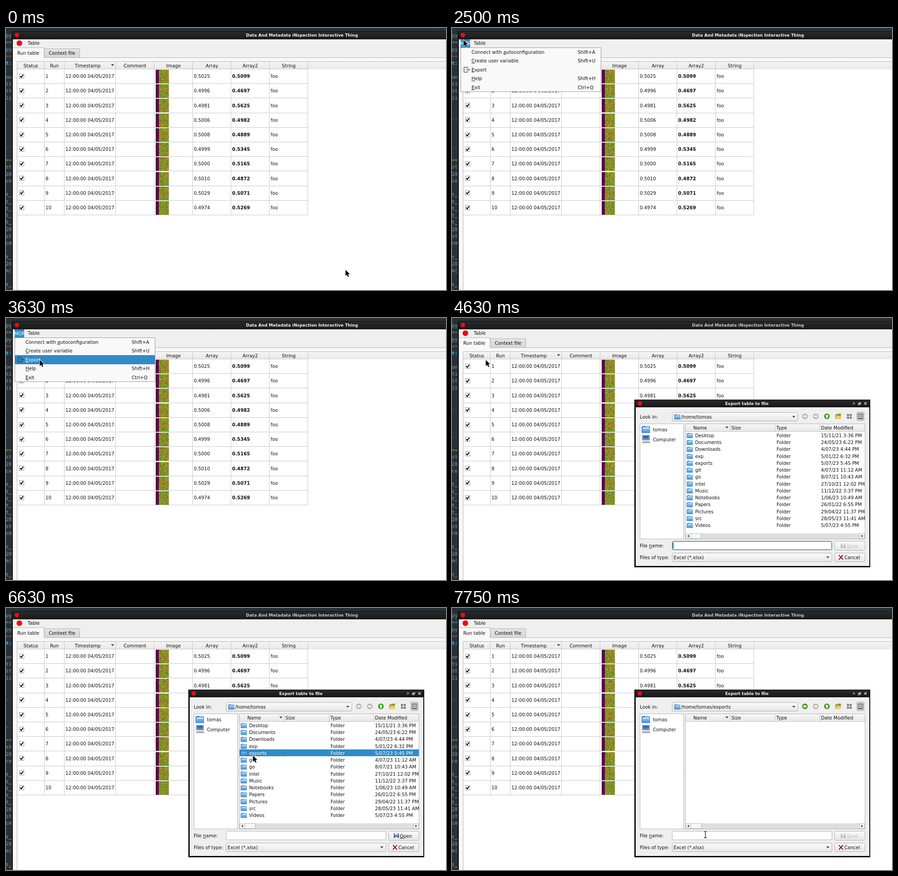
An HTML page with a canvas for the animation above (8 s loop, 970x578 px).

```html
<!DOCTYPE html>
<html lang="en">
<head>
<meta charset="utf-8">
<title>Export table</title>
<style>
  html, body { margin: 0; width: 970px; height: 578px; overflow: hidden; }
  canvas { display: block; }
</style>
</head>
<body>
<canvas id="stage" width="970" height="578"></canvas>
<script>
const g = document.getElementById('stage').getContext('2d');
const LOOP = 8000, STEP = 123;
const FONT = '10.2px "DejaVu Sans", sans-serif';
const BOLD = 'bold ' + FONT;
const TITLE = 'bold 9.07px "DejaVu Sans", sans-serif';
const MONO = '11px "Noto Sans Mono", monospace';
const BLUE = '#308cc6', PANEL = '#efefef', EDGE = '#b4b4b4', INK = '#111', RED = '#f00a14';
const USER = 'tomas';

// ---- drawing helpers ----
function rect(x, y, w, h, fill, stroke) {
  if (fill) { g.fillStyle = fill; g.fillRect(x, y, w, h); }
  if (stroke) { g.strokeStyle = stroke; g.lineWidth = 1; g.strokeRect(x + .5, y + .5, w - 1, h - 1); }
}
function fade(y0, y1, top, bottom) {
  const f = g.createLinearGradient(0, y0, 0, y1);
  f.addColorStop(0, top);
  f.addColorStop(1, bottom);
  return f;
}
function rounded(x, y, w, h, fill, stroke) {
  g.beginPath();
  g.roundRect(x + .5, y + .5, w - 1, h - 1, 2);
  g.fillStyle = fill; g.fill();
  g.strokeStyle = stroke; g.lineWidth = 1; g.stroke();
}
function path(points, { fill, stroke, width = 1, close = !!fill }) {
  g.beginPath();
  points.forEach(([x, y]) => g.lineTo(x, y));
  if (close) g.closePath();
  if (stroke) { g.strokeStyle = stroke; g.lineWidth = width; g.stroke(); }
  if (fill) { g.fillStyle = fill; g.fill(); }
}
function dot(x, y, r, fill) {
  g.beginPath(); g.arc(x, y, r, 0, 7);
  g.fillStyle = fill; g.fill();
}
// y is the middle of the capitals; "&" underlines the next letter
function text(s, x, y, color = INK, font = FONT, align = 'left') {
  g.font = font; g.fillStyle = color; g.textAlign = align;
  const cut = s.indexOf('&');
  s = s.replace('&', '');
  g.fillText(s, x, y + 3.6);
  if (cut >= 0) {
    const left = x + g.measureText(s.slice(0, cut)).width;
    g.fillRect(left, y + 4.7, g.measureText(s[cut]).width, .9);
  }
}
function at(x, y, draw) {
  g.save(); g.translate(x, y); draw(); g.restore();
}
function clipped(x, y, w, h, draw) {
  g.save(); g.beginPath(); g.rect(x, y, w, h); g.clip(); draw(); g.restore();
}
const downArrow = (x, y, c = '#444') => path([[x - 3.5, y - 2], [x + 3.5, y - 2], [x, y + 2]], { fill: c });

// ---- icons ----
function folder(x, y, k = 1) {
  at(x, y, () => {
    g.scale(k, k);
    path([[0, 1], [5, 0], [6, 1], [13, 1], [13, 11], [0, 11]], { fill: '#2b6fb5' });
    rect(1.5, 2.2, 10.5, 2, '#e4f1fb');
    rect(.8, 4.2, 12.6, 7, fade(4, 11, '#8cc4f2', '#3f8fdc'));
  });
}
function computer(x, y) {
  rect(x + 1, y, 17, 12, '#b9bec6', '#7c828c');
  rect(x + 3, y + 2, 13, 8, fade(y + 2, y + 10, '#2750a0', '#5b8fdc'));
  path([[x + 3, y + 14], [x + 17, y + 14], [x + 20, y + 18], [x, y + 18]], { fill: '#a4a9b0' });
}
function roundArrow(x, y, turn, color) {
  dot(x, y, 6.2, color);
  at(x, y, () => {
    g.rotate(turn);
    path([[-4.2, 0], [0, -4], [0, -1.5], [4, -1.5], [4, 1.5], [0, 1.5], [0, 4]], { fill: '#fff' });
  });
}
function disk(x, y, body, label) {
  rect(x, y, 11, 10, body);
  rect(x + 2, y, 7, 4.5, label);
  rect(x + 3, y + 7, 5, 3, '#ddd');
}
function exportIcon(x, y) {
  path([[x + 8, y + 3], [x + 8, y], [x, y], [x, y + 11], [x + 8, y + 11], [x + 8, y + 8]], { stroke: '#222' });
  path([[x + 4, y + 5.5], [x + 12, y + 5.5]], { stroke: '#222' });
  path([[x + 10, y + 3.5], [x + 12.3, y + 5.5], [x + 10, y + 7.5]], { stroke: '#222' });
}
function check(x, y) {
  rect(x, y, 11, 11, '#fff', '#9a9a9a');
  path([[x + 2.4, y + 5.2], [x + 4.6, y + 8], [x + 8.8, y + 2.4]], { stroke: '#000', width: 2 });
}

// ---- noisy thumbnails ----
const noise = document.createElement('canvas');
noise.width = 22; noise.height = 300;
{
  const n = noise.getContext('2d');
  let seed = 7;
  const rnd = () => (seed = seed * 16807 % 2147483647) / 2147483647;
  for (let x = 0; x < 22; x++)
    for (let y = 0; y < 300; y += 2) {
      n.fillStyle = `hsl(${15 + 95 * rnd()},60%,${34 + 12 * rnd()}%)`;
      n.fillRect(x, y, 1, 2);
    }
}

// ---- terminal behind the window: line number, text, colour ----
function terminal() {
  rect(0, 0, 970, 578, '#263238');
  const lines = '0py 1== 2py 3==r 4t:b 6on 7ti 8it 9li 12..y 16..y 18==o 19st 20%28 21ce 23t_ 24t_ 25t_ 26t_ 27t_ 28%28 29st 30cm 32t_ 33%28 34m( 36t_';
  const tint = { r: '#c4524e', b: '#4fb3e8', y: '#a8b436', o: '#c8962e' };
  for (const entry of lines.split(' ')) {
    const [, row, word, c] = entry.match(/^(\d+)%?(..)(.?)$/);
    text(word, -.5, 16.5 + 15.27 * row, tint[c] || '#87989f', c === 'b' ? 'bold ' + MONO : MONO);
  }
}

// ---- main window ----
const EDGES = [24, 84, 128, 241, 326, 411, 495.5, 580, 665];
const HEADS = ['Status', 'Run', 'Timestamp', 'Comment', 'Image', 'Array', 'Array2', 'String'];
const ARRAY = [.5025, .4996, .4981, .5006, .5008, .4999, .5, .501, .5029, .4974];
const ARRAY2 = [.5099, .4697, .5625, .4982, .4889, .5345, .5165, .4872, .5071, .5269];

function mainWindow(active) {
  rect(13, 7, 957, 571, '#0c0c0c');
  rect(15, 8, 955, 17, fade(8, 25, '#2a2a2a', '#181818'));
  dot(24, 15.5, 4.8, RED);
  text('Data And Metadata iNspection Interactive Thing', 652.5, 15.5, active ? '#f2f2f2' : '#c8c8c8', TITLE, 'center');
  rect(15, 25, 955, 553, PANEL);
  dot(29.5, 33.5, 6.2, RED);
  text('Table', 48, 33.8);

  rect(15, 65, 955, 513, '#f8f8f8');
  rect(84, 65, 886, 1, EDGE);
  rect(84, 45, 79, 21, fade(45, 66, '#e4e4e4', '#d6d6d6'), EDGE);
  rect(15, 43, 69, 23, '#f8f8f8');
  rect(15, 43, 69, 1, EDGE);
  rect(83.5, 43, 1, 22, EDGE);
  text('Run table', 49, 55, INK, FONT, 'center');
  text('Context file', 123.5, 55.7, INK, FONT, 'center');
  table();
}
function table() {
  rect(24, 74, 946, 504, '#fff');
  rect(24, 74, 946, 17, fade(74, 91, '#f5f5f5', '#e8e8e8'));
  rect(24, 73.5, 946, 1, EDGE);
  rect(24, 74, 1, 504, EDGE);
  rect(25, 90, 641, 1, '#c4c4c4');
  HEADS.forEach((name, i) => {
    text(name, (EDGES[i] + EDGES[i + 1]) / 2 + .7 - (i === 2 ? 5 : 0), 83, INK, FONT, 'center');
    rect(EDGES[i + 1], 75, 1, 338, '#c6c6c6');
  });
  downArrow(235, 82);
  for (let i = 0; i < 10; i++) {
    const y = 106.5 + 32.22 * i, top = Math.round(y - 14.5);
    rect(25, Math.round(y + 15.6), 641, 1, '#c6c6c6');
    check(29, Math.round(y - 5.8));
    text(String(i + 1), 87, y);
    text('12:00:00 04/05/2017', 131, y);
    rect(330, top, 7, 30, '#560a48');
    g.drawImage(noise, 0, 30 * i, 22, 30, 337, top, 22, 30);
    text(ARRAY[i].toFixed(4), 414, y);
    text(ARRAY2[i].toFixed(4), 498.6, y, INK, BOLD);
    text('foo', 583.5, y);
  }
}

// ---- drop-down menu ----
const MENU = [['Connect with &autoconfiguration', 'Shift+A'], ['&Create user variable', 'Shift+U'],
  ['&Export', ''], ['&Help', 'Shift+H'], ['&Exit', 'Ctrl+Q']];

function menu(pointerY) {
  rect(19, 25, 21, 18, BLUE);
  clipped(19, 25, 21, 18, () => text('MOR', 18.5, 34, '#fff'));
  rect(19, 43, 310, 98, '#f9f9f9', '#999');
  const hover = Math.floor((pointerY - 43) / 19.5);
  MENU.forEach(([label, key], i) => {
    const y = 53.2 + 19.5 * i, lit = i === hover;
    if (lit) rect(20, Math.round(y - 10.5), 308, 20, BLUE, '#2a7bb0');
    text(label, 43, y, lit ? '#fff' : INK);
    text(key, 277, y, lit ? '#fff' : INK);
  });
  exportIcon(26.5, 86.5);
}

// ---- file dialog ----
const FILES = `Desktop|15/11/21 3:36 PM
Documents|24/05/23 6:22 PM
Downloads|4/07/23 4:44 PM
exp|5/01/22 6:32 PM
exports|5/07/23 5:45 PM
git|4/07/23 11:12 AM
go|8/07/21 10:43 AM
intel|27/10/21 12:02 PM
Music|11/12/22 3:37 PM
Notebooks|1/06/23 10:49 AM
Papers|26/01/22 6:55 PM
Pictures|29/04/22 11:37 PM
src|28/05/23 11:41 AM
Videos|5/07/23 4:55 PM`.split('\n').map(line => line.split('|'));

const button = (x, y, w, h) => rounded(x, y, w, h, fade(y, y + h, '#fafafa', '#e7e7e7'), '#b0b0b0');

function dialog(t) {
  const picked = t >= 6500 && t < 6750, canOpen = t >= 6630 && t < 6750;
  const inside = t >= 6750, focus = t < 6500;
  rect(402, 180, 520, 370, '#0a0a0a');
  rect(404, 181, 516, 16, fade(181, 197, '#2a2a2a', '#161616'));
  rect(405, 197, 515, 350, PANEL);
  dot(414, 188.5, 4.8, RED);
  text('Export table to file', 650, 188.5, '#f2f2f2', TITLE, 'center');
  path([[883, 191], [886, 188.5], [886, 185]], { stroke: '#ddd' });
  path([[885, 188.5], [889, 189.5]], { stroke: '#ddd' });
  rect(895, 188, 5, 4, null, '#ddd');
  rect(897, 186, 5, 4, null, '#ddd');
  path([[909, 186], [914, 191]], { stroke: '#ddd', width: 1.4 });
  path([[914, 186], [909, 191]], { stroke: '#ddd', width: 1.4 });

  text('Look in:', 414, 218);
  button(485, 208, 278, 20);
  folder(490, 212.5);
  text(`/home/${USER}${inside ? '/exports' : ''}`, 505, 218);
  downArrow(753.5, 218);
  roundArrow(778, 217, 0, inside ? '#3f9a1c' : '#b5b5b5');
  roundArrow(802, 217, Math.PI, '#b5b5b5');
  roundArrow(826.5, 217, Math.PI / 2, '#3f9a1c');
  path([[845, 213], [850, 211], [857, 213], [857, 223], [845, 223]], { fill: '#b99a3c' });
  path([[848, 216], [859, 216], [856, 223], [845, 223]], { fill: '#e8cf6c' });
  dot(855, 213, 2.6, '#5aa632');
  for (let i = 0; i < 4; i++) rect(871 + i % 2 * 6, 212 + (i >> 1) * 6, 4, 4, '#fff', '#222');
  rounded(892, 207, 17, 20, '#d6d6d6', '#a5a5a5');
  rect(895, 211, 11, 12, '#fff', '#222');
  for (let y = 213; y < 222; y += 2) rect(897, y, 7, 1, '#555');

  rect(414, 233, 97, 255, '#fff', EDGE);
  folder(418, 238, 1.4);
  text(USER, 443, 246);
  computer(418, 258);
  text('Computer', 443, 268);
  for (let y = 355; y < 367; y += 3) rect(512.5, y, 1, 1, '#aaa');
  fileList(picked, inside);

  text('File &name:', 414, 502.7);
  rounded(485, 492, 353, 20, '#fff', focus ? '#2a709e' : '#b0b0b0');
  if (focus) {
    rect(486, 493, 351, 18, null, '#a9cfe6');
    if (t < 5250 || (t >= 5750 && t < 6250)) rect(487, 495, 1, 14, '#000');
  }
  button(843, 492, 68, 21);
  if (canOpen) {
    disk(855, 497, '#3a5f94', '#cfe0f4');
    text('&Open', 868, 503);
  } else {
    disk(857, 498, '#bdbdbd', '#e4e4e4');
    text('&Save', 870.5, 503, '#bdbdbd');
  }
  text('Files of type:', 414, 528);
  button(485, 518, 353, 20);
  text('Excel (*.xlsx)', 488.5, 528);
  downArrow(828.5, 528);
  button(843, 518, 68, 20);
  path([[853, 523], [862, 533]], { stroke: '#8c1420', width: 2 });
  path([[862, 523], [853, 533]], { stroke: '#8c1420', width: 2 });
  text('Cancel', 865, 528.5);
}
function fileList(picked, empty) {
  rect(514, 233, 397, 255, '#fff', EDGE);
  rect(515, 234, 395, 17, fade(234, 251, '#f7f7f7', '#e6e6e6'));
  rect(515, 250, 395, 1, '#c4c4c4');
  [['Name', 532], ['Size', 616], ['Type', 715], ['Date Modified', 813.5]].forEach(([name, x], i) => {
    text(name, x, 242.5);
    if (i) rect(x - 3, 235, 1, 15, '#c4c4c4');
  });
  downArrow(606, 241.5);
  if (!empty) clipped(515, 251, 395, 224, () => FILES.forEach(([name, date], i) => {
    const y = 259.2 + 15.25 * i, lit = picked && name === 'exports', color = lit ? '#fff' : INK;
    if (lit) {
      rect(515, 312, 395, 15, BLUE);
      rect(515, 312, 99, 15, null, '#2a7bb0');
    }
    folder(517.5, y - 5.5);
    if (lit) rect(517, y - 6, 14, 12, 'rgba(48,140,198,.5)');
    text(name, 536, y, color);
    text('Folder', 715.5, y, color);
    text(date, 813.5, y, color);
  }));
  rect(515, 475, 395, 12, '#dedede');
  rect(515, 475, 12, 12, '#f3f3f3', '#c0c0c0');
  rect(898, 475, 12, 12, '#f3f3f3', '#c0c0c0');
  rect(526, 475, 24, 12, '#f7f7f7', '#b8b8b8');
  path([[522.5, 478], [522.5, 484], [519, 481]], { fill: '#333' });
  path([[902.5, 478], [902.5, 484], [906, 481]], { fill: '#333' });
}

// ---- pointer: start time, steps, goal x, goal y, easing power for x and y ----
const MOVES = [
  [880, 5, 248, 243, 1.6, 1.6],
  [1750, 5, 25, 26, 3, 1.75],
  [3250, 4, 74, 92, 1.4, 1.4],
  [5130, 4, 296, 312, 1.4, 1.4],
  [5750, 5, 544, 325, 1.7, 1.7],
  [7380, 4, 558, 500, 1.6, 1.6],
];
function pointerAt(t) {
  let x = 748, y = 533;
  for (const [start, steps, goalX, goalY, px, py] of MOVES) {
    if (t < start) break;
    const left = 1 - Math.min(1, (Math.floor((t - start) / STEP) + 1) / steps);
    x = goalX + (x - goalX) * left ** px;
    y = goalY + (y - goalY) * left ** py;
  }
  return [x, y];
}
function pointer(x, y, beam) {
  at(Math.round(x), Math.round(y), () => {
    if (beam) {
      for (const [color, width] of [['#fff', 3], ['#000', 1.2]]) {
        path([[.5, -7], [.5, 7]], { stroke: color, width });
        for (const end of [-7, 7]) path([[-2.5, end], [3.5, end]], { stroke: color, width });
      }
    } else {
      path([[.5, .5], [.5, 14], [3.5, 11.2], [6, 16], [8.2, 15], [5.9, 10.3], [10, 10]],
        { fill: '#000', stroke: '#fff', width: 1.6 });
    }
  });
}

function draw(t) {
  const [x, y] = pointerAt(t), dialogOpen = t >= 4630;
  terminal();
  mainWindow(!dialogOpen);
  if (dialogOpen) dialog(t);
  else if (t >= 2500) menu(y);
  pointer(x, y, dialogOpen && x > 485 && y > 492);
}

const begin = performance.now();
(function tick() {
  draw((performance.now() - begin) % LOOP);
  requestAnimationFrame(tick);
})();
</script>
</body>
</html>
```
